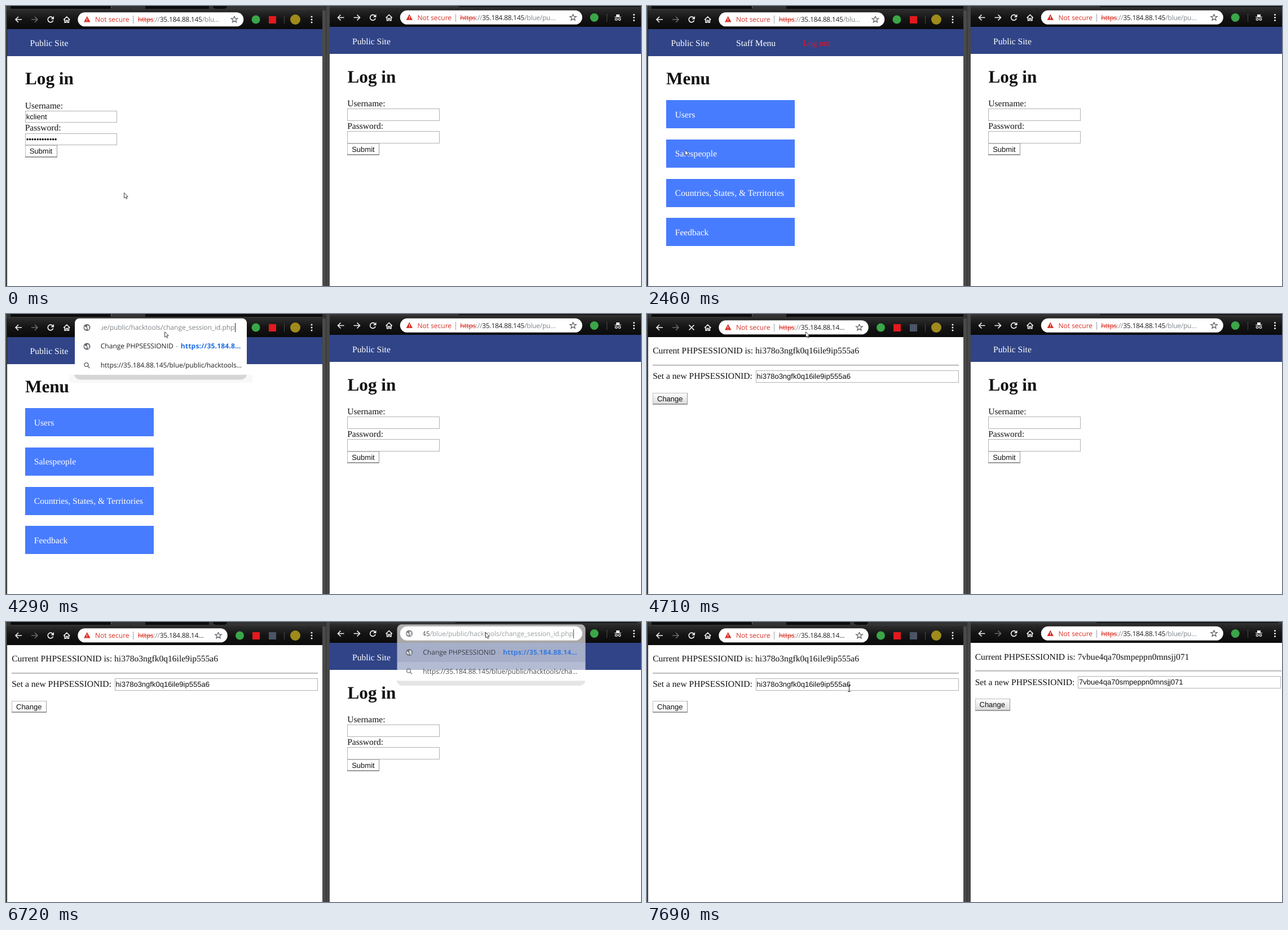
These frames come from a looping animation (1126 px wide and 497 px high, 8000 ms). An HTML page with a canvas:

```html
<!DOCTYPE html>
<html lang="en">
<head>
<meta charset="utf-8">
<title>Session change demo</title>
<style>
html, body { margin: 0; width: 100%; height: 100%; overflow: hidden; background: #474747; }
canvas { display: block; }
</style>
</head>
<body>
<canvas id="stage" width="1126" height="497"></canvas>
<script>
const ctx = document.getElementById('stage').getContext('2d');
const LOOP = 8000;
const SERIF = '15.55px "Liberation Serif", "Times New Roman", serif';
const HEAD = 'bold 31.2px "Liberation Serif", "Times New Roman", serif';
const SANS = '13px "Liberation Sans", Arial, sans-serif';
const UI = '12px "Open Sans", "Noto Sans", sans-serif';
const UI_BOLD = 'bold ' + UI;
const NAVY = '#304487', RED = '#d93025', GREY = '#80868b', INK = '#202124';
const HOST = '35.184.88.145';
const TOOL_PATH = '/blue/public/hacktools/change_session_id.php';
const LIST_SPACING = -0.08;

// [start time, x, y, shape]
const POINTER = [
  [0, 209, 331, 'arrow'], [120, 186, 316, 'arrow'], [240, 138, 289, 'arrow'],
  [360, 90, 264, 'arrow'], [480, 67, 255, 'arrow'], [2770, 142, 158, 'arrow'],
  [2890, 209, 83, 'arrow'], [3030, 252, 48, 'arrow'], [3150, 279, 28, 'beam'],
  [3300, 278, 29, 'beam'], [3450, 280, 34, 'beam'], [3580, 281, 35, 'beam'],
  [4290, 281, 31, 'arrow'], [5130, 330, 30, 'arrow'], [5250, 460, 27, 'arrow'],
  [5380, 612, 24, 'arrow'], [5500, 738, 22, 'beam'], [5650, 832, 23, 'beam'],
  [5800, 845, 22, 'beam'], [5920, 851, 22, 'beam'], [6720, 850, 18, 'arrow'],
  [7020, 850, 22, 'beam'], [7410, 802, 46, 'arrow'], [7540, 750, 74, 'arrow'],
  [7690, 358, 118, 'beam']
];

let ox = 0, oy = 0;   // offset of the window being drawn

const between = (t, a, b) => t >= a && t < b;
const current = (list, t) => list.reduce((hit, item) => item[0] <= t ? item : hit);

function rect(x, y, w, h, fill) {
  const left = Math.round(x + ox), top = Math.round(y + oy);
  ctx.fillStyle = fill;
  ctx.fillRect(left, top, Math.round(x + ox + w) - left, Math.round(y + oy + h) - top);
}

function round(x, y, w, h, r, fill) {
  ctx.fillStyle = fill;
  ctx.beginPath();
  ctx.roundRect(x + ox, y + oy, w, h, r);
  ctx.fill();
}

function disc(x, y, r, fill) {
  ctx.fillStyle = fill;
  ctx.beginPath();
  ctx.arc(x + ox, y + oy, r, 0, 7);
  ctx.fill();
}

function ring(x, y, r, color, width, from = 0, to = 7) {
  ctx.strokeStyle = color;
  ctx.lineWidth = width;
  ctx.beginPath();
  ctx.arc(x + ox, y + oy, r, from, to);
  ctx.stroke();
}

function trace(points) {
  for (let i = 0; i < points.length; i += 2)
    ctx[i ? 'lineTo' : 'moveTo'](points[i] + ox, points[i + 1] + oy);
}

function lines(color, width, ...paths) {
  ctx.strokeStyle = color;
  ctx.lineWidth = width;
  ctx.beginPath();
  paths.forEach(trace);
  ctx.stroke();
}

function polygon(fill, ...points) {
  ctx.fillStyle = fill;
  ctx.beginPath();
  trace(points);
  ctx.closePath();
  ctx.fill();
}

function text(str, x, y, font, color, spacing = 0) {
  ctx.font = font;
  ctx.letterSpacing = spacing + 'px';
  ctx.fillStyle = color;
  ctx.fillText(str, x + ox, y + oy);
  return x + ctx.measureText(str).width;
}

const urlText = (str, x, y, color, spacing = -0.25) => text(str, x, y, UI, color, spacing);

function clipped(x, y, w, h, draw) {
  ctx.save();
  ctx.beginPath();
  ctx.rect(x + ox, y + oy, w, h);
  ctx.clip();
  draw();
  ctx.restore();
}

// Vertical gradient from [position, colour] stops
function shade(y, h, ...stops) {
  const g = ctx.createLinearGradient(0, y + oy, 0, y + oy + h);
  for (const [at, color] of stops) g.addColorStop(at, color);
  return g;
}

function field(x, y, w, h, value = '') {
  rect(x, y, w, h, '#b2b2b2');
  rect(x + 1, y + 1, w - 2, h - 2, '#fff');
  text(value, x + 2, y + 15, SANS, '#111');
}

function button(x, y, w, label, tone) {
  rect(x, y, w, 21.5, '#999');
  rect(x, y, w - 1, 19.5, '#bdbdbd');
  rect(x + 1, y + 1, w - 2, 18.5, shade(y, 20, [0, '#fff'], [1, tone]));
  text(label, x + 8, y + 15, SANS, '#111');
}

function nav(right) {
  rect(2, 40.5, right - 2, 48, NAVY);
  text('Public Site', 42.5, 71.3, SERIF, '#fff');
}

function loginPage(right, user, secret, tone) {
  nav(right);
  text('Log in', 34, 139.3, HEAD, '#111');
  text('Username:', 33.7, 181.6, SERIF, '#111');
  field(33.7, 185.6, 163.6, 21.6, user);
  text('Password:', 33.7, 221.4, SERIF, '#111');
  field(33.7, 225.5, 163.6, 21.6, secret);
  button(33.7, 247, 57, 'Submit', tone);
}

function menuPage(right) {
  nav(right);
  text('Staff Menu', 158, 71.3, SERIF, '#fff');
  text('Log out', 276.5, 71.3, SERIF, '#ee1020');
  text('Menu', 34, 139.3, HEAD, '#111');
  ['Users', 'Salespeople', 'Countries, States, & Territories', 'Feedback'].forEach((label, i) => {
    const y = 167.2 + i * 69.7;
    rect(34, y, 228, 50, '#487cff');
    text(label, 49.8, y + 30.3, SERIF, '#fff');
  });
}

function sessionPage(id, tone) {
  text('Current PHPSESSIONID is: ' + id, 10.2, 70.3, SERIF, '#111');
  rect(10, 89.6, 543, 1, '#a4a4a4');
  rect(10, 90.6, 543, 1, '#d4d4d4');
  text('Set a new PHPSESSIONID:', 10.2, 115.2, SERIF, '#111');
  field(192.6, 99.8, 360, 21.8, id);
  button(10, 139.7, 62, 'Change', tone);
}

function globe(x, y) {
  disc(x, y, 6, '#5f6368');
  ctx.fillStyle = '#fff';
  ctx.beginPath();
  ctx.ellipse(x + ox - 2.5, y + oy + 1, 1.6, 3, -0.6, 0, 7);
  ctx.ellipse(x + ox + 2, y + oy - 2, 2.3, 1.4, 0.5, 0, 7);
  ctx.ellipse(x + ox + 2.5, y + oy + 2.8, 1.5, 1.1, 0, 0, 7);
  ctx.fill();
}

function star(x, y) {
  const p = [];
  for (let i = 0; i <= 10; i++) {
    const r = i % 2 ? 2.6 : 6, a = -Math.PI / 2 + i * Math.PI / 5;
    p.push(x + r * Math.cos(a), y + r * Math.sin(a));
  }
  lines('#5f6368', 1.3, p);
}

function toolbarIcons(loading, canForward) {
  const y = 24, white = '#f1f1f1';
  lines(white, 1.6, [28, y, 17, y], [22, y - 5, 17, y, 22, y + 5]);
  lines(canForward ? white : '#6b6b6b', 1.6, [45, y, 56, y], [51, y - 5, 56, y, 51, y + 5]);
  if (loading) {
    lines(white, 1.7, [74.5, 19.5, 83.5, 28.5], [83.5, 19.5, 74.5, 28.5]);
  } else {
    ring(79, y, 4.8, white, 1.7, 0.3, 5.5);
    polygon(white, 85, 18, 85, 23.5, 79.5, 23.5);
  }
  lines(white, 1.6, [102, 24.5, 107.7, 19, 113.4, 24.5],
    [104, 23, 104, 29.3, 106.5, 29.3, 106.5, 25.5, 109, 25.5, 109, 29.3, 111.4, 29.3, 111.4, 23]);
}

// mode: idle, selected or typed; a null path cuts the host short
function addressBar(w, mode, path, fill) {
  const picked = mode === 'selected';
  if (picked) round(126, 10, w + 2, 27.5, 14, '#8ab4f8');
  round(127.3, 11.3, w, 25, 12.5, fill);
  if (mode === 'typed') return;
  polygon(RED, 143.7, 18, 149.5, 28.5, 138, 28.5);
  rect(143.2, 21.5, 1, 3.6, fill);
  rect(143.2, 26, 1, 1.3, fill);
  text('Not secure', 158, 28.3, UI, RED);
  rect(225, 17, 1, 14, '#9aa0a6');
  if (picked) rect(233, 15.5, w - 144, 17, '#3584e4');
  const tint = color => picked ? '#fff' : color;
  const end = urlText('https', 233.8, 28.3, tint(RED));
  rect(233.8, 24, end - 233.8, 1, tint(RED));
  let x = urlText('://', end, 28.3, tint(GREY));
  x = urlText(path === null ? HOST.slice(0, -1) + '…' : HOST, x, 28.3, tint(INK));
  urlText(path || '', x, 28.3, tint(GREY));
  star(127.3 + w - 16.3, 24);
}

function suggestions(w, alpha, boldHost, listPath, rowFill) {
  const pw = w + 11, top = 7.8, h = 100;
  ctx.globalAlpha = alpha;
  clipped(112, top + h, pw + 20, 15, () => {
    if (alpha === 1) round(112, 89, pw + 20, 33, 3, '#f8f8f8');
    round(121, 90, pw + 1, 26.5, 10, '#d6d6d6');
  });
  round(122, top, pw, h, 8, shade(top, h, [0, '#fff'], [0.327, '#fff'],
    [0.327, rowFill], [0.667, rowFill], [0.667, '#fff'], [1, '#fff']));

  ctx.globalAlpha = Math.min(1, alpha + 0.15);
  globe(143.5, 24);
  const right = 127.3 + w - 16;
  clipped(168, 12, w, 24, () => {
    ctx.font = UI;
    ctx.letterSpacing = LIST_SPACING + 'px';
    const start = right - ctx.measureText(HOST + TOOL_PATH).width;
    const x = urlText(HOST, start, 28.3, INK, LIST_SPACING);
    urlText(TOOL_PATH, x, 28.3, GREY, LIST_SPACING);
  });
  rect(right + 0.5, 16, 1, 16, INK);

  globe(143.5, 57.5);
  text('Change PHPSESSIONID', 167.8, 61.3, UI, INK);
  text('-', 301, 61.3, UI, GREY);
  text('https://' + boldHost, 309.7, 61.3, UI_BOLD, '#1a6be0', 0.2);
  ring(142.5, 90, 3.4, '#5f6368', 1.4);
  lines('#5f6368', 1.4, [145, 92.5, 148.5, 96]);
  urlText('https://' + HOST + listPath, 167.8, 95, INK, LIST_SPACING);
  ctx.globalAlpha = 1;
}

function dots(x) {
  for (const dy of [-5, 0, 5]) disc(x, 24 + dy, 1.5, '#f1f1f1');
}

function toolbar(right) {
  rect(2, 7, right - 2, 33.5, shade(7, 33, [0, '#2c2c2c'], [0.5, '#141414'], [1, '#0b0b0b']));
}

function hatAndGlasses() {
  const white = '#f1f1f1';
  rect(510.5, 18.5, 6, 3.5, white);
  rect(507.5, 22.5, 12, 1.4, white);
  for (const x of [510.6, 516.4]) ring(x, 27, 1.9, white, 1.2);
}

function leftWindow(t) {
  const active = between(t, 780, 6170);
  rect(0, 0, 568, 8, '#333');
  rect(8, 0, 178, 5, '#0c0c0c');
  rect(247, 0, active ? 314 : 113, 5, '#0c0c0c');
  if (!active) round(367, -6, 25, 11, 5, '#0c0c0c');
  rect(186, 0, 1, 4, '#666');
  rect(2, 8, 559, 489, '#fff');
  toolbar(561);

  if (t < 2460) loginPage(561, 'kclient', '•'.repeat(12), t < 360 ? '#fff' : t < 480 ? '#eee' : '#dcdcdc');
  else if (t < 4710) menuPage(561);
  else sessionPage('hi378o3ngfk0q16ile9ip555a6', t < 6170 ? '#dcdcdc' : '#fff');

  const moved = t >= 4570;
  toolbarIcons(between(t, 930, 2460) || between(t, 4570, 4870), false);
  const mode = between(t, 3450, 4290) ? 'selected' : between(t, 4290, 4570) ? 'typed' : 'idle';
  const fill = between(t, 3150, 3300) ? '#f1f3f4' : between(t, 3300, 3450) ? '#e8eaed' : '#fff';
  const width = moved ? 265.5 : 294;
  addressBar(width, mode, moved ? null : '/blu…', fill);

  const shift = moved ? -28.5 : 0;
  disc(443 + shift, 24, 7.5, '#3aa648');
  rect(465.5 + shift, 17.5, 13, 13, '#e3191e');
  if (moved) rect(465.5, 17.5, 13, 13, '#4b5566');
  rect(493, 17, 1, 14, '#4a4a4a');
  disc(513, 24, 9, '#a08a1c');
  dots(542);
  if (mode === 'typed') suggestions(width, 1, '35.184.8…', '/blue/public/hacktools…', '#fff');
}

function rightWindow(t) {
  rect(574, 0, 552, 4, '#333');
  rect(t >= 6170 ? 797 : 803, 0, 323, 2, '#151515');
  rect(574, 4, 552, 493, '#fff');
  ox = 571.5;
  oy = -3.5;
  toolbar(556);

  if (t < 7150) loginPage(556, '', '', '#fff');
  else sessionPage('7vbue4qa70smpeppn0mnsjj071', '#dcdcdc');

  toolbarIcons(between(t, 7020, 7270), t < 7020);
  const mode = between(t, 6170, 6720) ? 'selected' : between(t, 6720, 7020) ? 'typed' : 'idle';
  const hover = between(t, 5800, 6170) || between(t, 7020, 7410);
  addressBar(323, mode, '/blue/pu…', between(t, 5650, 5800) ? '#eff1f2' : hover ? '#e8eaed' : '#fff');
  disc(471.7, 24, 7.5, '#3aa648');
  rect(493, 17, 1, 14, '#4a4a4a');
  hatAndGlasses();
  dots(542);
  if (mode === 'typed') {
    suggestions(323, t < 6880 ? 0.64 : 1, '35.184.88.14…', '/blue/public/hacktools/cha…', '#e8eaed');
  }
  ox = oy = 0;
}

function divider() {
  rect(0, 0, 1, 497, '#555');
  rect(1, 8, 1, 489, '#222');
  rect(561, 8, 6, 489, '#4a4a4a');
  rect(567, 0, 1, 497, '#2e2e2e');
  rect(568, 0, 6, 497, '#464646');
}

function pointer(t) {
  const [, x, y, shape] = current(POINTER, t);
  if (shape === 'beam') {
    lines('#333', 1, [x - 2, y - 5.5, x + 3, y - 5.5], [x + 0.5, y - 5, x + 0.5, y + 5],
      [x - 2, y + 5.5, x + 3, y + 5.5]);
    return;
  }
  const outline = [0, 0, 0, 9.5, 2.2, 7.6, 3.8, 11, 5.4, 10.2, 3.9, 7, 6.7, 7, 0, 0]
    .map((v, i) => v + 0.5 + (i % 2 ? y : x));
  polygon('#fff', ...outline);
  lines('#333', 0.9, outline);
}

const began = performance.now();

function frame() {
  const t = (performance.now() - began) % LOOP;
  ctx.textRendering = 'geometricPrecision';
  leftWindow(t);
  divider();
  rightWindow(t);
  pointer(t);
  requestAnimationFrame(frame);
}

frame();
</script>
</body>
</html>
```
